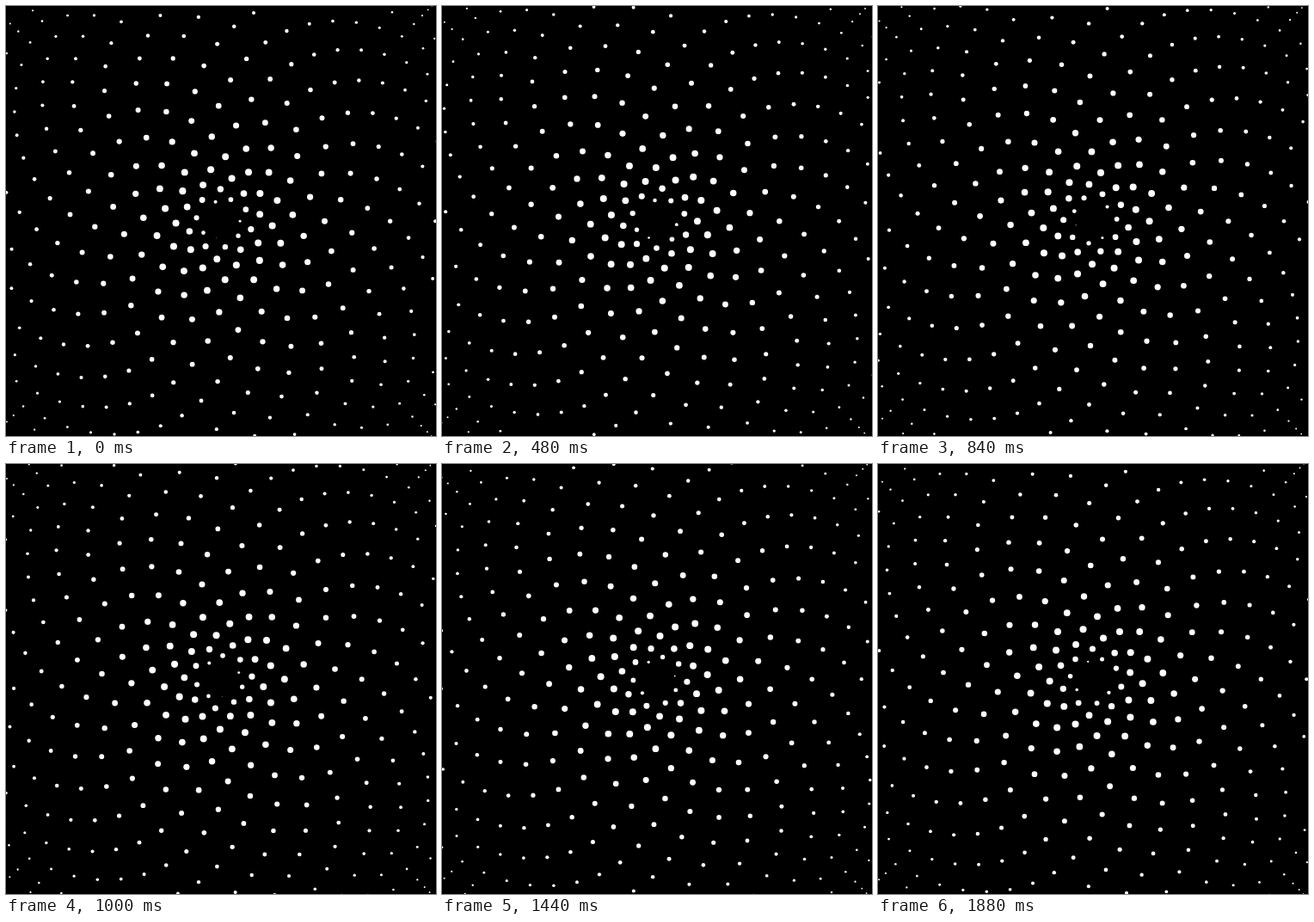
An HTML page with a canvas that plays this animation: 500 by 500 pixels, repeating every 1.92 s.

```html
<!DOCTYPE html>
<html lang="en">
<head>
<meta charset="utf-8">
<title>Spiral dots</title>
<style>
  html, body { margin: 0; width: 100%; height: 100%; overflow: hidden; background: #000; }
  canvas { display: block; width: 500px; height: 500px; }
</style>
</head>
<body>
<canvas id="stage" width="500" height="500"></canvas>
<script>
const ctx = document.getElementById('stage').getContext('2d');

const LOOP = 1920, TICK = 40;
const BIRTHS = 71;                           // new dots per loop
const STEP = 2 * Math.PI * 21 / BIRTHS;      // turn between successive dots
const OLDEST = 640;
const CENTER = 250.2;
const LIMIT = 365, START = 20.5, SPEED = 1.4, EASE_AGE = 55.6, DECAY = 0.00525;

// Steady drift at first, then an exponential approach to the limit.
function distance(age) {
  if (age < EASE_AGE) return START + SPEED * age;
  const gap = LIMIT - START - SPEED * EASE_AGE;
  return LIMIT - gap * Math.exp(-DECAY * (age - EASE_AGE));
}

function dotRadius(age, dist) {
  const growth = Math.sqrt(1 - Math.exp(-(age + 0.1) / 10));
  return growth * (0.7 + 0.0113 * (LIMIT - dist));
}

function draw(time) {
  const tick = Math.floor((time + 4) / TICK) * TICK;
  const shift = BIRTHS * (tick % LOOP) / LOOP;
  ctx.fillStyle = '#000';
  ctx.fillRect(0, 0, 500, 500);
  ctx.fillStyle = '#fff';
  for (let n = Math.ceil(-shift - 0.09); n + shift < OLDEST; n++) {
    const age = n + shift;
    const angle = (1 - n) * STEP;
    const dist = distance(age);
    ctx.beginPath();
    ctx.arc(CENTER + dist * Math.cos(angle), CENTER + dist * Math.sin(angle),
            dotRadius(age, dist), 0, 2 * Math.PI);
    ctx.fill();
  }
}

function loop(now) {
  draw(now);
  requestAnimationFrame(loop);
}

draw(0);
requestAnimationFrame(loop);
</script>
</body>
</html>
```
